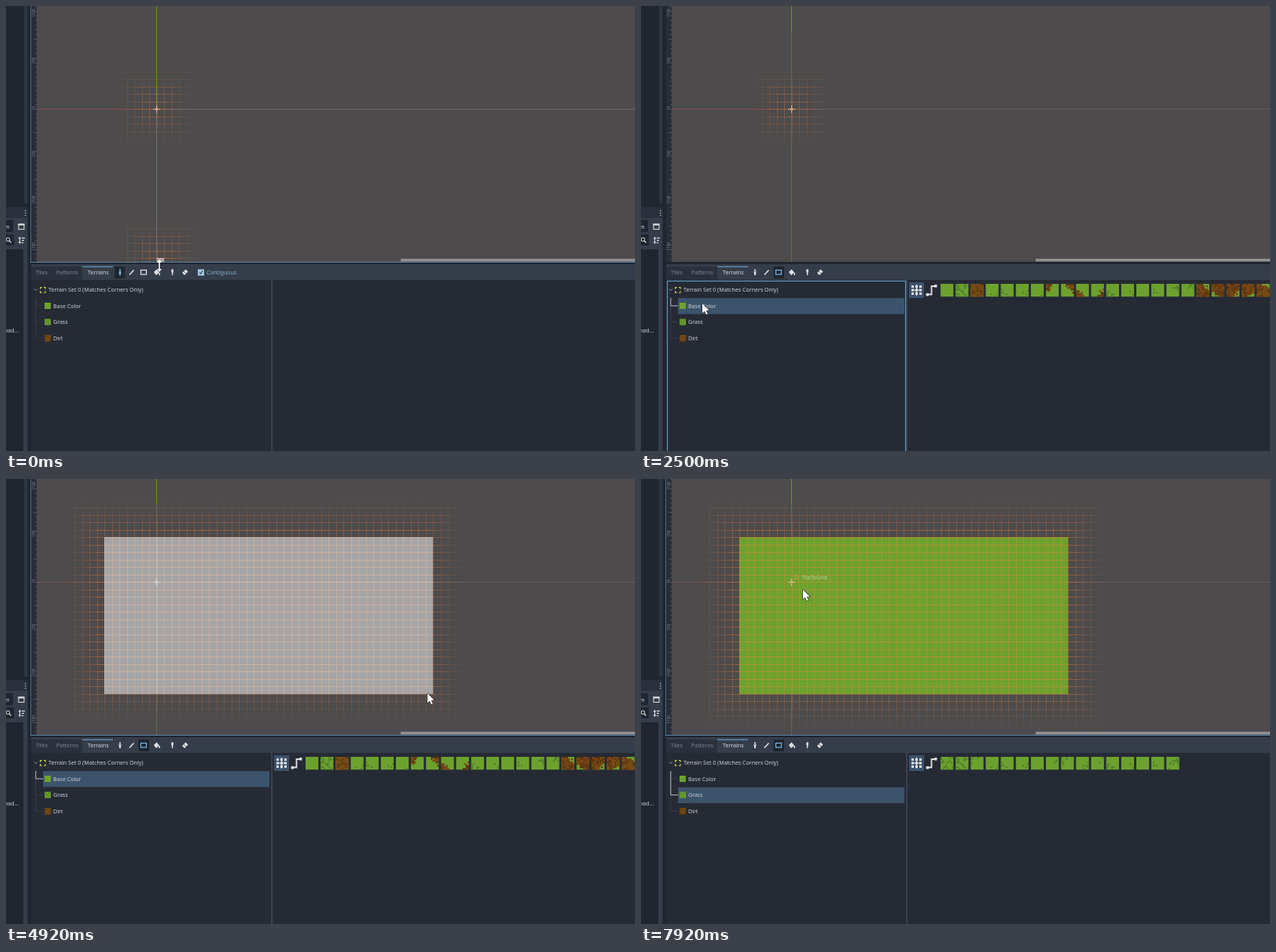
Write an HTML page with a canvas that moves like this. It is 800 px wide and 567 px high and loops after 8000 ms.

```html
<!DOCTYPE html>
<html lang="en">
<head>
<meta charset="utf-8">
<title>Terrain painting</title>
<style>
html, body { margin: 0; height: 100%; overflow: hidden; background: #252a35; }
canvas { display: block; }
</style>
</head>
<body>
<canvas id="stage" width="800" height="567"></canvas>
<script>
const g = document.getElementById('stage').getContext('2d');
const LOOP = 8000, CELL = 9.5, OX = 192.2, OY = 131.9, ROW = 20.6, TILE = 19.15;
const GREEN = '#6da12e', WHITE = '#e0e0e0', BLUE = '#70b8e8';
const PANEL = '#363d4a', DARK = '#20252f', BODY = '#252a35';
const CLICK = { tool: 240, base: 2410, press: 3570, release: 5240, grass: 6075 };

// Pointer stops: time, x, y
const PATH = [
  [80, 195, 331], [240, 175, 338], [580, 175, 338], [830, 154, 73], [1420, 139, 81],
  [1580, 139, 81], [2420, 78, 379], [2950, 78, 379], [3580, 128, 78], [4083, 388, 210],
  [4820, 536, 273], [5330, 536, 273], [5830, 75, 396], [6900, 77, 399], [7250, 505, 400],
  [7660, 330, 350], [7917, 206, 141]
];

function pointer(t) {
  let i = 1;
  while (i < PATH.length - 1 && PATH[i][0] < t) i++;
  const [t0, x0, y0] = PATH[i - 1], [t1, x1, y1] = PATH[i];
  const k = Math.min(1, Math.max(0, (t - t0) / (t1 - t0)));
  const ease = 1 - (1 - k) ** 1.4;
  return [x0 + (x1 - x0) * ease, y0 + (y1 - y0) * ease];
}

function box(x, y, w, h, color) {
  g.fillStyle = color;
  g.fillRect(x, y, w, h);
}

function frame(x, y, w, h, color, width = 1) {
  g.strokeStyle = color;
  g.lineWidth = width;
  g.strokeRect(x, y, w, h);
}

function trace(points) {
  g.beginPath();
  for (let i = 0; i < points.length; i += 2) g.lineTo(points[i], points[i + 1]);
}

function line(points, color, width = 1) {
  g.strokeStyle = color;
  g.lineWidth = width;
  trace(points);
  g.stroke();
}

function shape(points, color) {
  g.fillStyle = color;
  trace(points);
  g.fill();
}

function text(s, x, y, color = '#cdcfd4', size = 7.05) {
  g.font = size + 'px "Noto Sans", "Open Sans", sans-serif';
  g.fillStyle = color;
  g.fillText(s, x, y);
}

function noise(x, y, seed) {
  const v = Math.sin(x * 12.99 + y * 78.23 + seed * 37.72) * 43758.55;
  return v - Math.floor(v);
}

// Corner bits: 1 top left, 2 top right, 4 bottom left, 8 bottom right
function tile(x, y, size, dirt, mask, seed) {
  box(x, y, size, size, GREEN);
  const n = 8, p = size / n, bit = b => mask & b ? 1 : 0;
  for (let j = 0; j < n; j++) for (let i = 0; i < n; i++) {
    const u = (i + .5) / n, v = (j + .5) / n, r = noise(i, j, seed);
    const w = (bit(1) * (1 - u) + bit(2) * u) * (1 - v) + (bit(4) * (1 - u) + bit(8) * u) * v;
    if (dirt ? w + (r - .5) * .35 < .45 : w < .35 || r < .8) continue;
    const color = !dirt ? '#4f822b' : noise(j, i, seed + 3) > .6 ? '#5c3112' : '#7a4212';
    box(x + i * p, y + j * p, p + .2, p + .2, color);
  }
}

function palette(grass) {
  box(341, 352, 19, 20, '#3c526c');
  line([350.5, 355, 350.5, 369], WHITE, 1.2);
  line([344, 362, 357, 362], WHITE, 1.2);
  for (const dx of [-5, 0, 5]) for (const dy of [-4.5, 0, 4.5])
    box(349 + dx, 360.5 + dy, 3, 3, WHITE);
  line([364, 367.5, 369.5, 367.5, 369.5, 357, 375, 357], WHITE, 1.8);
  box(362.5, 366, 3.5, 3.5, WHITE);
  box(373, 355, 3.5, 3.5, WHITE);
  const count = grass ? 16 : 22;
  for (let i = 0; i < count; i++) {
    const corner = 1 << noise(i, 2, 1) * 4;
    const dirt = !grass && (i === 2 || i > 6 && i < 11 || i > 16);
    let mask = corner;
    if (dirt) mask = i === 2 ? 15 : i < 11 ? 1 << i - 7 : 15 - corner;
    else if (grass ? i % 15 < 2 : i === 1) mask = 15;
    else if (!grass && i === 0) mask = 0;
    tile(381 + i * TILE, 354, 16.3, dirt, mask, i + 5);
  }
}

const px = c => Math.floor(OX + c * CELL), py = c => Math.floor(OY + c * CELL);
const cellAt = (x, y) => [Math.floor((x - OX) / CELL), Math.floor((y - OY) / CELL)];

// Cell lines around an area, fading out over five cells
function grid([x0, y0, x1, y1], cut = 0) {
  const l = x0 - 5, t = y0 - 5, r = x1 + 5 - cut, b = y1 + 5 - cut;
  for (let y = t; y < b; y++) for (let x = l; x < r; x++) {
    const edge = Math.min(x - l, r - x - 1, y - t, b - y - 1) / 5;
    const a = Math.min(1, edge + .1), X = px(x), Y = py(y);
    box(X, Y, px(x + 1) - X, 1, `rgba(255,128,51,${a * .42})`);
    box(X, Y + 1, 1, py(y + 1) - Y - 1, `rgba(255,128,51,${a * .34})`);
  }
}

function area([x0, y0, x1, y1], color) {
  box(px(x0), py(y0), px(x1) - px(x0), py(y1) - py(y0), color);
}

// Painted cells, from the press to the pointer one picture earlier
function selection(t) {
  const [cx, cy] = cellAt(...pointer(t - 83.4));
  return [-7, -6, Math.max(-7, cx) + 1, Math.max(-6, cy) + 1];
}

function ruler() {
  box(32, 0, 7, 326, '#282d38');
  for (let i = -22; i < 33; i++) {
    const w = i % 10 === 0 ? 7 : i % 5 === 0 ? 4 : 2;
    box(39 - w, 131.4 + i * 5.95, w, .7, '#5d636e');
  }
  for (let i = -2; i < 4; i++) {
    g.save();
    g.translate(37, 130.4 + i * 59.5);
    g.rotate(-Math.PI / 2);
    text(Math.abs(i * 50), 0, 0, '#858a94', 4.6);
    g.restore();
  }
}

function viewport(t, x, y) {
  const start = t < 80, painted = t > CLICK.release;
  g.save();
  g.beginPath();
  g.rect(39, 0, 761, 326);
  g.clip();
  box(39, 0, 761, 326, '#4d4b4c');
  box(39, 131, 153, 1, '#78534c');
  box(192, 131, 608, 1, start ? '#696569' : '#6a5a5b');
  box(191, 0, 1, 326, start ? '#6b6c70' : '#636b54');
  box(191, 0, 1, start ? 131 : 33, '#629522');
  if (t < 3250) grid([0, 0, 0, 0]);
  if (painted) {
    const full = selection(CLICK.release);
    area(full, GREEN);
    grid(full);
  } else if (start || t > 3250) {
    const [cx, cy] = start ? [0, 20] : cellAt(x, y);
    const cells = t > CLICK.press ? selection(t) : [cx, cy, cx + 1, cy + 1];
    grid(cells, start ? 0 : 1);
    area(cells, 'rgba(255,255,255,.5)');
  }
  // Origin mark
  const mark = t > 3300 && !painted ? '#e3dcd8' : '#efc0aa';
  frame(190.5, 130.5, 2, 2, mark, .8);
  line([187, 131.5, 189.5, 131.5], mark);
  line([193.5, 131.5, 196, 131.5], mark);
  line([191.5, 127, 191.5, 129.5], mark);
  line([191.5, 133.5, 191.5, 136], mark);
  if (t > 7900) {
    frame(196, 123, 4, 5, 'rgba(225,150,90,.7)');
    text('TileToGrid', 204, 128, 'rgba(255,255,255,.55)', 6.9);
  }
  box(502, 322, 298, 3.5, '#919090');
  g.restore();
}

function dock() {
  box(0, 0, 32, 567, DARK);
  box(23, 0, 4.5, 252, '#2e3440');
  box(0, 270, 27.5, 297, PANEL);
  box(0, 256, 27.5, 14, '#2a303b');
  box(0, 310, 22, 257, DARK);
  box(0, 273, 9, 15, DARK);
  box(0, 291, 10, 14, DARK);
  for (const y of [260, 263, 266]) box(24, y, 1.4, 1.4, '#aeb2b8');
  text('m', -2, 284);
  frame(16, 278, 7, 6.5, WHITE);
  box(15.5, 277.5, 8, 2, WHITE);
  g.beginPath();
  g.arc(2.5, 297.5, 2.3, 0, 7);
  g.stroke();
  line([4, 299, 6.5, 301.5], WHITE, 1.3);
  line([17.5, 295, 17.5, 302], WHITE);
  shape([15.5, 296.5, 17.5, 294, 19.5, 296.5], WHITE);
  shape([15.5, 300.5, 17.5, 303, 19.5, 300.5], WHITE);
  for (let i = 0; i < 3; i++) box(20, 295 + i * 3, 4 - i, 1.2, WHITE);
  text('nad...', -2, 415.5);
}

function toolbar(t) {
  const old = t < CLICK.tool;
  box(32, 329, 768, 20, PANEL);
  box(32, 332, 65, 17, '#2b313c');
  box(97, 331.5, 39, 1.3, '#5f96bb');
  text('Tiles', 38, 342, '#7d8592');
  text('Patterns', 64, 342, '#7d8592');
  text('Terrains', 104, 342, '#d8dade');
  box(old ? 138 : 168.5, 332, 13.5, 15, DARK);
  const select = old ? BLUE : WHITE, rect = old ? WHITE : BLUE;
  box(144, 335.5, 2, 2, select);
  box(144, 338.5, 2, 4.5, select);
  box(143, 338.5, 4, 1, select);
  line([157, 342.5, 162.5, 336.5], WHITE, 1.5);
  frame(171.5, 336.5, 7, 5.5, rect, 1.2);
  shape([188, 339, 191.5, 335.5, 195, 339.5, 191, 343], WHITE);
  box(194.5, 340, 1.5, 3, WHITE);
  box(210.3, 335.5, 2.6, 4, WHITE);
  box(210.9, 339, 1.4, 4, WHITE);
  shape([224, 340, 228.5, 335.5, 231.5, 338.5, 227, 343], WHITE);
  line([226, 338, 229.3, 341.2], PANEL, .7);
  if (old) {
    box(244, 335.5, 8, 8, '#a3c8e2');
    line([246, 339.5, 247.5, 341.2, 250.3, 337.4], '#2d4356', 1.1);
    text('Contiguous', 255, 342, '#80b1d4');
  }
}

function branch(row, color) {
  const y = 382 + row * ROW;
  line([37.8, 372, 37.8, y, 47, y], color);
}

function tree(t, x, y, focus) {
  box(32, 349, 768, 218, BODY);
  box(337.3, 349, 1.5, 218, '#424957');
  const chosen = t < CLICK.base ? -1 : t < CLICK.grass ? 0 : 1;
  const hover = Math.floor((y - 372.1) / ROW);
  if (hover >= -1 && hover < 3 && x > 38 && x < 335) {
    const left = hover < 0 ? 41 : 47;
    box(left, 372.1 + hover * ROW, 335 - left, 20.3, '#2e3846');
  }
  if (chosen >= 0) box(47, 372.3 + chosen * ROW, 288, 20.2, '#3c536c');
  for (let i = 0; i < 3; i++) branch(i, '#343a46');
  if (chosen >= 0) branch(chosen, '#b1b6bf');
  line([36, 360.5, 38, 362.5, 40, 360.5], '#9da2aa', .9);
  for (const dx of [0, 5]) for (const dy of [0, 5]) {
    box(43 + dx, 358 + dy, 2.7, 2.7, dx === dy ? '#b5d44c' : '#e1c750');
    box(44.2 + dx * .74, 359.2 + dy * .74, 1.8, 1.8, BODY);
  }
  text('Terrain Set 0 (Matches Corners Only)', 54, 364);
  ['Base Color', 'Grass', 'Dirt'].forEach((name, i) => {
    const top = 378 + i * ROW;
    tile(49, top, 8, i === 2, i ? 15 : 0, 6);
    text(name, 60, top + 6.7);
  });
  if (chosen >= 0) palette(chosen === 1);
  if (focus) frame(33.5, 350.5, 303, 220, '#5f96bb', 1.2);
}

function cursor(t, x, y) {
  if (t < 80) {
    line([x, y - 5, x, y + 6], '#222', 3);
    line([x, y - 5, x, y + 6], '#fff', 1.6);
    shape([x - 3, y - 4, x, y - 8, x + 3, y - 4], '#fff');
    shape([x - 3, y + 4, x, y + 8, x + 3, y + 4], '#fff');
    return;
  }
  const p = [0, 0, 0, 12.4, 2.8, 9.8, 4.9, 14.2, 6.8, 13.3, 4.9, 9, 8.6, 8.8]
    .map((v, i) => v + (i % 2 ? y : x));
  line([...p, p[0], p[1]], '#222', 1.2);
  shape(p, '#fff');
}

function draw(now) {
  // Twelve pictures a second
  const t = Math.floor((now % LOOP + 4) * .012) / .012 % LOOP;
  const [x, y] = pointer(t);
  const treeFocus = t > CLICK.base && t < 3260 || t > CLICK.grass && t < 7740;
  dock();
  viewport(t, x, y);
  ruler();
  box(29, 326, 771, 3, DARK);
  toolbar(t);
  tree(t, x, y, treeFocus);
  if (!treeFocus) {
    box(31, 0, 1, 327, '#466a86');
    box(31, 326, 769, 1, '#5585a6');
  }
  cursor(t, x, y);
}

function loop(now) {
  draw(now);
  requestAnimationFrame(loop);
}
draw(0);
requestAnimationFrame(loop);
</script>
</body>
</html>
```
